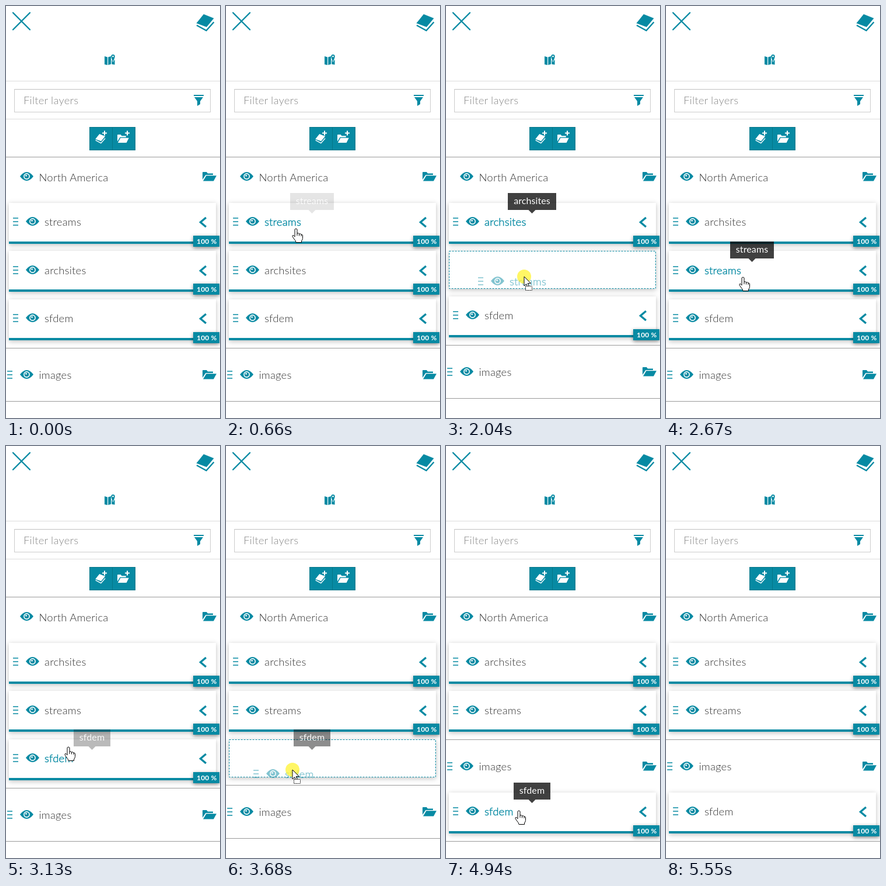
Recreate the animation shown at these times as an HTML page. Size 367 by 705 pixels, loop 6.1 s.

```html
<!DOCTYPE html>
<html lang="en">
<head>
<meta charset="utf-8">
<title>Layer tree drag and drop</title>
<style>
html, body { margin: 0; width: 100%; height: 100%; overflow: hidden; background: #fff; }
svg { display: block; width: 367px; height: 705px; }
text { font: 300 18.5px Lato, sans-serif; letter-spacing: .2px; fill: #333; white-space: pre; }
.hot { fill: #078aa3; stroke: #078aa3; stroke-width: .5px; }
.hint { fill: #888; }
.pct { font-size: 12px; font-weight: 700; fill: #fff; }
.tip { font-size: 16px; font-weight: 400; fill: #fff; text-anchor: middle; letter-spacing: .1px; }
.card { filter: drop-shadow(0 2px 4px rgba(0,0,0,.25)); }
.badge { filter: drop-shadow(0 2px 3px rgba(0,0,0,.45)); }
</style>
</head>
<body>
<svg id="stage" viewBox="0 0 367 705">
  <g id="fixed"></g>
  <g id="tree"></g>
</svg>
<script>
const TEAL = '#078aa3', LOOP = 6100;
const $ = id => document.getElementById(id);

// ---- drawing helpers ----
const at = (x, y, body, extra = '') => `<g transform="translate(${x} ${y})" ${extra}>${body}</g>`;
const scale = (k, body) => `<g transform="scale(${k})">${body}</g>`;
const rect = (x, y, w, h, fill, extra = '') =>
  `<rect x="${x}" y="${y}" width="${w}" height="${h}" fill="${fill}" ${extra}/>`;
const disc = (x, y, r, fill, extra = '') => `<circle cx="${x}" cy="${y}" r="${r}" fill="${fill}" ${extra}/>`;
const path = (d, fill = TEAL, extra = '') => `<path d="${d}" fill="${fill}" ${extra}/>`;
const line = (d, width, color = TEAL, extra = '') =>
  path(d, 'none', `stroke="${color}" stroke-width="${width}" ${extra}`);
const label = (x, y, s, cls = '') => `<text x="${x}" y="${y}" class="${cls}">${s}</text>`;
const rule = (y, color) => rect(0, y, 367, 1, color);

// ---- icons ----
const eye = (x, y) => at(x, y,
  path('M-11.5 0Q-6-7.5 0-7.5T11.5 0Q6 7.5 0 7.5T-11.5 0Z') +
  disc(0, 0, 5.4, '#fff') + disc(0, 0, 3.8, TEAL) + disc(-1, -1.2, 1.4, '#fff'));
const grip = (x, y) => at(x, y, line('M0-6H9M0 0H9M0 6H9', 1.7));
const folder = (color = TEAL) =>
  path('M0 13V1Q0 0 1 0H7L9 2.5H18V5H5.5Z', color) + path('M1 15.5L6.5 6.3H24L19 15.5Z', color);
const layers = color =>
  path('M13 0L30.5 7L18 22L.5 15.5Z', color) + line('M1 19L17.5 28L30.5 13.5', 2.4, color);
const plus = line('M0-4V4M-4 0H4', 2, '#fff');

// ---- cursors, hot spot at 0,0 ----
const outline = 'stroke="#000" stroke-width="1" stroke-linejoin="round"';
const arrow = path('M0 0V16L3.7 12.6L6.3 18.5L8.8 17.4L6.2 11.6H11.4Z', '#fff', outline);
const cursors = {
  none: '',
  arrow,
  hand: path('M-2 1.2Q0-1.4 2 1.2V8Q4.6 6.8 5.5 9Q8 7.8 9 10Q11.4 9.6 11.5 12V16.5' +
    'Q11.3 19 9.5 21V23.5H0L-1 20.5Q-4 17-6 13.5Q-6.3 10.8-4 11.5L-2 13.8Z', '#fff', outline) +
    line('M2 8V12M5.5 9V12.5M9 10V13', 1, '#000'),
  drag: arrow + rect(2.5, 16.5, 11, 7, '#fff', 'stroke="#000" stroke-dasharray="1.5 1"'),
  no: line('M-5.5-5.5L5.5 5.5', 2, '#3a3a10') +
    disc(0, 0, 8.2, 'none', 'stroke="#3a3a10" stroke-width="2"')
};

// ---- timeline ----
// Stretches of regular picture changes: start, end, steps
const stretches = [[0, 0, 1], [120, 660, 8], [740, 1350, 9], [1430, 2040, 9], [2120, 2120, 1],
  [2350, 2350, 1], [2520, 2670, 3], [2820, 3210, 6], [3440, 3440, 1], [3590, 4160, 8],
  [4240, 4310, 2], [4710, 4710, 1], [4860, 4940, 2], [5400, 5550, 3]];
// Pointer: time, x, y
const route = [[120, 256, 661], [350, 185, 520], [540, 136, 410], [660, 120, 381], [1000, 120, 381],
  [1200, 124, 392], [1430, 133, 415], [1740, 134, 443], [2040, 134, 463], [2120, 134, 464],
  [2350, 133, 464], [2520, 132, 464], [2740, 132, 464], [2976, 112, 505], [3210, 98, 535],
  [3550, 98, 535], [3671, 114, 554], [4160, 124, 617], [4310, 124, 624], [4710, 125, 624],
  [5320, 125, 624], [5400, 155, 648], [5475, 200, 681]];
const steps = [
  [0, { top: ['streams', 'archsites', 'sfdem'], sub: [], drag: '', hover: '', cursor: 'none', press: false }],
  [120, { cursor: 'arrow' }],
  [560, { cursor: 'hand' }],
  [640, { hover: 'streams' }],
  [890, { press: true }],
  [1040, { drag: 'streams', hover: '', cursor: 'drag', grab: [86, 24] }],
  [1340, { cursor: 'no' }],
  [1650, { cursor: 'drag', hover: 'archsites' }],
  [1730, { top: ['archsites', 'streams', 'sfdem'] }],
  [2520, { drag: '', press: false, cursor: 'hand', hover: 'streams' }],
  [2895, { hover: '' }],
  [2970, { hover: 'sfdem' }],
  [3440, { press: true }],
  [3590, { drag: 'sfdem', hover: '', cursor: 'drag', grab: [74, 25] }],
  [3740, { cursor: 'no' }],
  [3830, { cursor: 'drag', hover: 'images' }],
  [3910, { top: ['archsites', 'streams'], sub: ['sfdem'] }],
  [4860, { drag: '', press: false, cursor: 'hand', hover: 'sfdem' }],
  [5400, { cursor: 'arrow', hover: '' }],
  [5540, { cursor: 'none' }]
];
// Tooltips: name, fade in, fade out
const tips = [['streams', 640, 790, 1050, 1200], ['archsites', 1650, 1800, 2510, 2511],
  ['streams', 2510, 2660, 2880, 3030], ['sfdem', 3000, 3150, 3611, 3761],
  ['images', 3850, 4000, 4850, 4851], ['sfdem', 4800, 4935, 5330, 5480]];
const tipWidth = { streams: 75, sfdem: 63, images: 71, archsites: 83 };

const clamp = v => Math.max(0, Math.min(1, v));

function snap(t) {
  const [a, b, n] = stretches.filter(s => s[0] <= t).pop();
  if (n < 2) return a;
  const gap = (b - a) / (n - 1);
  return a + gap * Math.min(n - 1, Math.floor((t - a) / gap + 1e-6));
}

function pointer(t) {
  const i = route.findIndex(p => p[0] >= t);
  if (i <= 0) return (i ? route[route.length - 1] : route[0]).slice(1);
  const [a, b] = [route[i - 1], route[i]], k = (t - a[0]) / (b[0] - a[0]);
  return [1, 2].map(j => a[j] + (b[j] - a[j]) * k);
}

// ---- tree ----
const head = (name, x, y, hot) =>
  grip(x + 7, y + 32) + eye(x + 40.5, y + 31.5) + label(x + 61, y + 39, name, hot ? 'hot' : '');

function card(name, top, hot) {
  const y = Math.floor(top), r = Math.round(top);
  return rect(5, y, 355, 70, '#fff', 'class="card"') + rect(5, y + 66, 355, 4, TEAL) +
    head(name, 5, r, hot) + line(`M343 ${r + 25}L333.5 ${r + 33}L343 ${r + 41}`, 3.4) +
    rect(321, y + 56, 45, 19, TEAL, 'class="badge"') + label(327, y + 70, '100 %', 'pct');
}

function slot(top) {
  const y = Math.floor(top);
  return rect(5, y, 355, 65, '#fff', 'class="card"') +
    rect(5.5, y + .5, 354, 64, '#fff', `stroke="${TEAL}" stroke-dasharray="3 2"`);
}

function tooltip(name, mid, y, alpha) {
  const w = tipWidth[name] / 2;
  return at(mid, y - 50, path(`M${-w} 0H${w}V29H6L0 35L-6 29H${-w}Z`, '#000', 'fill-opacity=".75"') +
    label(0, 19, name, 'tip'), `opacity="${alpha}"`);
}

function draw(t) {
  const s = Object.assign({}, ...steps.filter(e => e[0] <= t + .01).map(e => e[1]));
  const mids = {};
  let y = 337, out = '';
  const list = names => names.forEach(name => {
    const gone = name === s.drag;
    mids[name] = Math.round(y) + 33;
    out += gone ? slot(y) : card(name, y, name === s.hover);
    y += gone ? 77.5 : 82.5;
  });
  list(s.top);
  const base = Math.round(y);
  mids.images = base + 47;
  out += rule(base, '#999') + grip(2, base + 46) + eye(35.5, base + 45.5) +
    label(56.5, base + 53, 'images', s.hover === 'images' ? 'hot' : '') + at(337, base + 38, folder());
  y = base + 91;
  list(s.sub);
  out += rule(Math.round(y), '#999');

  const [px, py] = pointer(t).map(Math.round);
  if (s.drag) out += at(px - s.grab[0], py - s.grab[1], head(s.drag, 0, 0, true), 'opacity=".5"');
  for (const [name, a, b, c, e] of tips) {
    const alpha = clamp((t - a) / (b - a)) * clamp((e - t) / (e - c));
    if (alpha > 0) out += tooltip(name, name === 'images' ? 182.5 : 147.5, mids[name], alpha);
  }
  if (s.press) out += disc(px, py, 12, '#fff22a', 'fill-opacity=".72"');
  $('tree').innerHTML = out + at(px, py, cursors[s.cursor]);
}

$('fixed').innerHTML =
  line('M12 11.5L41 40.5M41 11.5L12 40.5', 2.4, TEAL, 'stroke-linecap="round"') +
  at(326, 14, layers(TEAL)) +
  path('M169 86L174 87.5V101L169 100ZM175.2 87.5L180 86V99.5L175.2 101ZM181.2 92L183.5 96L186.5 91.5V100.5L181.2 99.5Z') +
  path('M183.5 95Q180.3 89 180.3 86.3A3.2 3.2 0 0 1 186.7 86.3Q186.7 89 183.5 95Z') +
  disc(183.5, 86.3, 1.3, '#fff') +
  rule(128, '#ddd') + rule(193, '#ddd') + rule(258, '#999') +
  rect(14.5, 142.5, 336, 39, '#fff', 'stroke="#ccc"') + rect(15, 143, 335, 1, '#eee') +
  label(30, 168, 'Filter layers', 'hint') +
  path('M322 152H339V154H322ZM323 156H338L333 163V168L328 171V163Z') +
  rect(143, 207, 79, 40, '#067587') + rect(144, 208, 38, 38, TEAL) + rect(183, 208, 38, 38, TEAL) +
  at(153, 219, scale(.56, layers('#fff'))) + at(169, 217.5, plus) +
  at(191, 220, scale('.82 .9', folder('#fff'))) + at(208, 217.5, plus) +
  eye(35.5, 291.5) + label(56.5, 300, 'North America') + at(337, 284, folder());

let last = -1;
function tick(now) {
  const t = snap(now % LOOP);
  if (t !== last) draw(last = t);
  requestAnimationFrame(tick);
}
draw(0);
requestAnimationFrame(tick);
</script>
</body>
</html>
```
